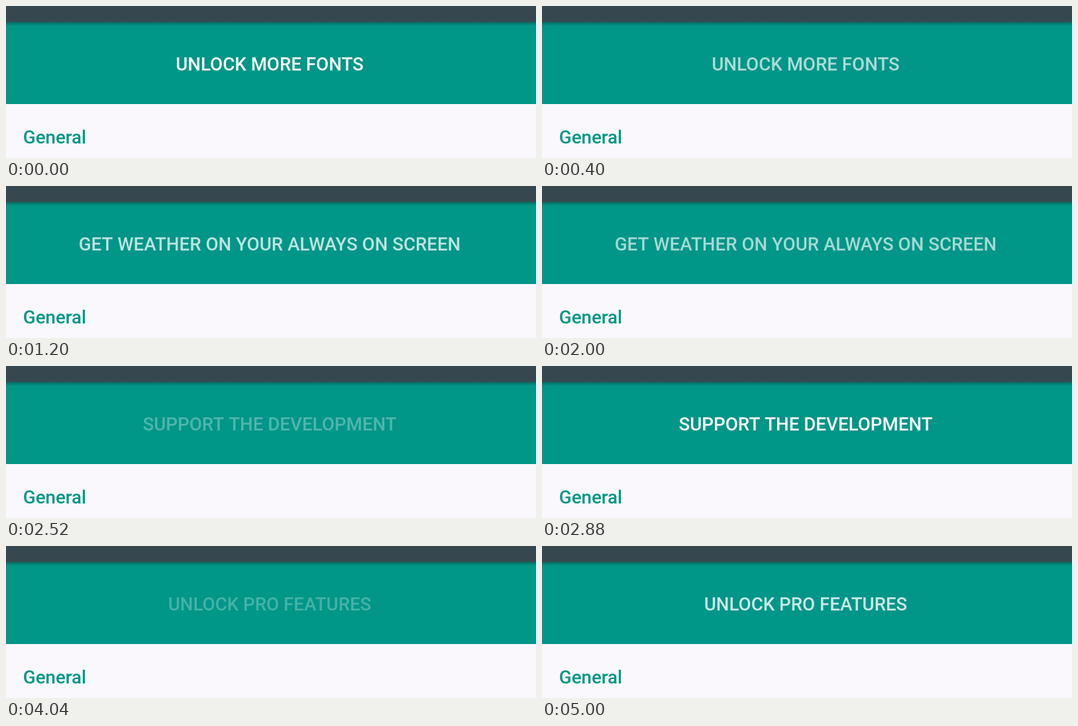
Animation, 800 px wide and 231 px high, one loop 5.04 s. Source, as an HTML page with a canvas:

```html
<!DOCTYPE html>
<html lang="en">
<head>
<meta charset="utf-8">
<title>Rotating banner</title>
<style>
  html, body { margin: 0; width: 100%; height: 100%; overflow: hidden; }
  canvas { display: block; }
</style>
</head>
<body>
<canvas id="stage" width="800" height="231"></canvas>
<script>
const ctx = document.getElementById('stage').getContext('2d');
const LOOP = 5040;
const FADE = 520;
const TEAL = '#009688';

// Start times of each fade, in ms
const banners = [
  { text: 'UNLOCK MORE FONTS', fadeIn: -FADE, fadeOut: 180 },
  { text: 'GET WEATHER ON YOUR ALWAYS ON SCREEN', fadeIn: 815, fadeOut: 1765 },
  { text: 'SUPPORT THE DEVELOPMENT', fadeIn: 2360, fadeOut: 3290 },
  { text: 'UNLOCK PRO FEATURES', fadeIn: 3900, fadeOut: 4850 }
];

const progress = (time, start) => Math.min(1, Math.max(0, (time - start) / FADE));

function opacity(banner, time) {
  const shown = progress(time, banner.fadeIn);
  const hidden = progress(time, banner.fadeOut) ** 1.3;
  return shown * (1 - hidden);
}

function fillBand(color, top, bottom) {
  ctx.fillStyle = color;
  ctx.fillRect(0, top, 800, bottom - top);
}

const shadow = ctx.createLinearGradient(0, 24, 0, 30);
shadow.addColorStop(0, 'rgba(20, 50, 50, 0.5)');
shadow.addColorStop(1, 'rgba(20, 50, 50, 0)');

function label(text, x, y, color, align) {
  ctx.font = '500 27.7px Roboto, sans-serif';
  ctx.textAlign = align;
  ctx.fillStyle = color;
  ctx.fillText(text, x, y);
}

function draw(time) {
  fillBand('#faf8fc', 149, 231);
  fillBand(TEAL, 24, 149);
  fillBand(shadow, 24, 30);
  fillBand('#37474f', 0, 24);
  label('General', 25.8, 209, TEAL, 'left');

  for (const banner of banners) {
    ctx.globalAlpha = opacity(banner, time);
    if (ctx.globalAlpha > 0) label(banner.text, 398, 97.8, '#fff', 'center');
  }
  ctx.globalAlpha = 1;
}

const start = performance.now();
function tick() {
  draw((performance.now() - start) % LOOP);
  requestAnimationFrame(tick);
}
tick();
</script>
</body>
</html>
```
